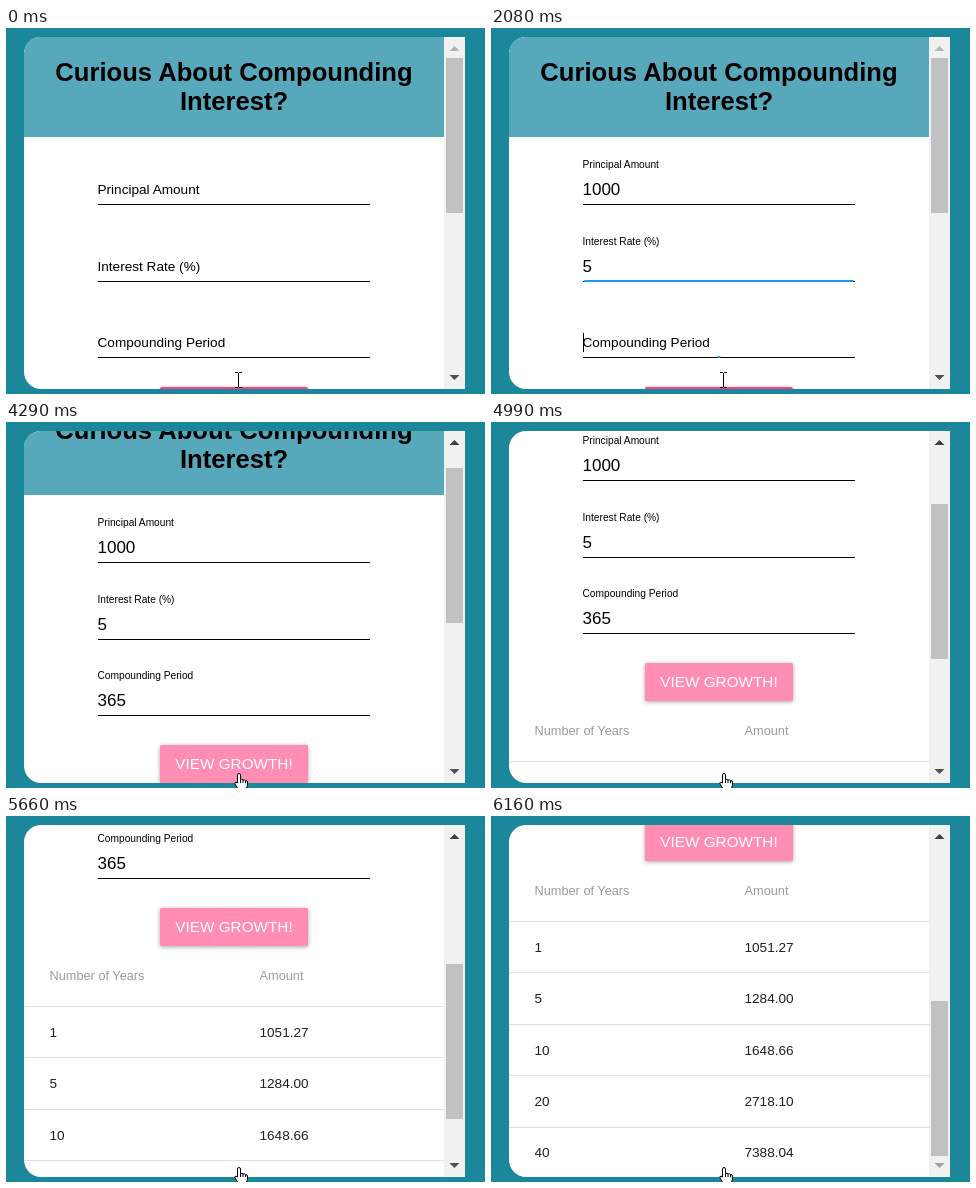
Write an HTML page that moves like this. It is 479 by 366 pixels and loops after 7.07 s.

```html
<!DOCTYPE html>
<html lang="en">
<head>
<meta charset="utf-8">
<title>Compound interest</title>
<style>
html, body { margin: 0; width: 100%; height: 100%; overflow: hidden; background: #1b879b; }
svg { display: block; font-family: "Liberation Sans", Arial, sans-serif; }
.title { font-weight: bold; font-size: 25.6px; text-anchor: middle; }
.label, .cell { font-size: 13.6px; }
.value { font-size: 17px; }
.head { font-size: 12.75px; fill: #9b9b9b; }
.cell { fill: #212121; }
.button { fill: #ff4081; filter: drop-shadow(0 1px 2px rgba(0, 0, 0, .35)); }
.action { font-size: 15.3px; fill: #fff; text-anchor: middle; }
</style>
</head>
<body>
<svg width="479" height="366">
  <clipPath id="panel"><path d="M35 9H459V361H35a17 17 0 0 1-17-17V26a17 17 0 0 1 17-17z"/></clipPath>
  <g clip-path="url(#panel)">
    <rect x="18" y="9" width="441" height="352" fill="#fff"/>
    <g id="page">
      <rect x="18" y="9" width="420" height="100" fill="#57a8ba"/>
      <text class="title" x="228" y="53">Curious About Compounding</text>
      <text class="title" x="228" y="82">Interest?</text>
      <g id="form"></g>
      <rect class="button" x="154" y="359" width="148" height="38" rx="2"/>
      <rect id="overlay" x="154" y="359" width="148" height="38" rx="2" fill="#fff"/>
      <text class="action" x="228" y="383">VIEW GROWTH!</text>
      <g id="table"></g>
    </g>
    <rect x="438" y="9" width="21" height="352" fill="#f1f1f1"/>
    <rect id="thumb" x="440" width="17" height="155" fill="#c1c1c1"/>
    <path id="up" d="M443.5 23l5-5 5 5z"/>
    <path id="down" d="M443.5 347l5 5 5-5z"/>
  </g>
  <path id="beam" d="M229 344.5h2.5l1 1 1-1h2.5M232.5 345v14M229 359.5h2.5l1-1 1 1h2.5" fill="none" stroke="#000"/>
  <path id="hand" d="M231.5 361V353a1.5 1.5 0 0 1 3 0v4.5q1.5-.8 2.5.5q1.7-.6 2.5.7q2-.4 2 1.3v3.5l-1.5 4h-7.5l-3.5-5.5q-.7-2 1-1.8zM234.5 357.5v3.5M237 358v3M239.5 358.7v2.5" fill="#fff" stroke="#000"/>
</svg>
<script>
const LOOP = 7070, FADE = 450, SUBMIT = 3530, MAX_SCROLL = 352, LEFT = 91.5;
const $ = id => document.getElementById(id);
const clamp = x => Math.min(1, Math.max(0, x));

// y is the underline; keys are the times at which each character is typed
const fields = [
  { name: 'Principal Amount', text: '1000', y: 176, on: 50, off: 1150, keys: [440, 550, 660, 770] },
  { name: 'Interest Rate (%)', text: '5', y: 253, on: 1150, off: 2080, keys: [1650] },
  { name: 'Compounding Period', text: '365', y: 329, on: 2080, off: SUBMIT, keys: [2600, 3010, 3170] }
];
const growth = [[1, '1051.27'], [5, '1284.00'], [10, '1648.66'], [20, '2718.10'], [40, '7388.04']];

function bezier(x1, y1, x2, y2) {
  const at = (a, b, u) => 3 * a * u * (1 - u) ** 2 + 3 * b * u * u * (1 - u) + u ** 3;
  return x => {
    if (x <= 0 || x >= 1) return clamp(x);
    let lo = 0, hi = 1;
    for (let i = 0; i < 20; i++) {
      const mid = (lo + hi) / 2;
      if (at(x1, x2, mid) < x) lo = mid; else hi = mid;
    }
    return at(y1, y2, lo);
  };
}
const easeOut = bezier(.23, 1, .32, 1);
const ease = bezier(.25, .1, .25, 1);
const fade = (t, start) => easeOut((t - start) / FADE);

function scrollAt(t) {
  if (t < SUBMIT) return 0;
  if (t < 4990) return 36 + 82 * clamp((t - 4810) / 180);
  if (t < 5545) return 118 + 118 * (1 - (1 - clamp((t - 4990) / 530)) ** 1.26);
  return 236 + 116 * ease((t - 5545) / 615);
}

$('form').innerHTML = fields.map(f => `
  <rect x="92" y="${f.y}" width="272" height="1"/>
  <rect class="focus" y="${f.y - 1}" height="2" fill="#2196f3"/>
  <text class="label">${f.name}</text>
  <text class="value" x="${LEFT}" y="${f.y - 9}"></text>
  <rect class="caret" y="${f.y - 24}" width="1" height="19"/>`).join('');
fields.forEach((f, i) => {
  for (const part of ['focus', 'label', 'value', 'caret'])
    f[part] = document.querySelectorAll('#form .' + part)[i];
});

const row = (kind, y, a, b) =>
  `<text class="${kind}" x="43.5" y="${y}">${a}</text><text class="${kind}" x="253.5" y="${y}">${b}</text>`;
$('table').innerHTML = row('head', 431, 'Number of Years', 'Amount') + growth.map(([years, sum], i) =>
  `<rect x="18" y="${Math.round(457 + 51.4 * i)}" width="420" height="1" fill="#e0e0e0"/>` +
  row('cell', Math.round(488 + 51.3 * i), years, sum)).join('');

const set = (el, attrs) => { for (const k in attrs) el.setAttribute(k, attrs[k]); };

function draw(t) {
  for (const f of fields) {
    const lift = fade(t, f.on);
    const width = 272 * clamp(lift - fade(t, f.off));
    const count = f.keys.filter(k => t >= k).length;
    set(f.focus, { x: 228 - width / 2, width });
    set(f.label, { transform: `translate(${LEFT} ${f.y - 10 - 26 * lift}) scale(${1 - .25 * lift})` });
    f.value.textContent = f.text.slice(0, count);
    set(f.caret, {
      x: Math.max(92, Math.floor(LEFT + 9.45 * count)),
      opacity: t >= f.on && t < f.off ? 1 : 0
    });
  }
  const scroll = Math.round(scrollAt(t));
  set($('page'), { transform: `translate(0 ${-scroll})` });
  set($('thumb'), { y: Math.round(30 + scroll * 155 / MAX_SCROLL) });
  set($('up'), { fill: scroll > 0 ? '#404040' : '#b5b5b5' });
  set($('down'), { fill: scroll < MAX_SCROLL ? '#505050' : '#a3a3a3' });
  set($('overlay'), { opacity: .4 * fade(t, SUBMIT) });
  set($('beam'), { opacity: t < SUBMIT ? 1 : 0 });
  set($('hand'), { opacity: t < SUBMIT ? 0 : 1 });
}

const start = performance.now();
function tick() {
  draw((performance.now() - start) % LOOP);
  requestAnimationFrame(tick);
}
tick();
</script>
</body>
</html>
```
